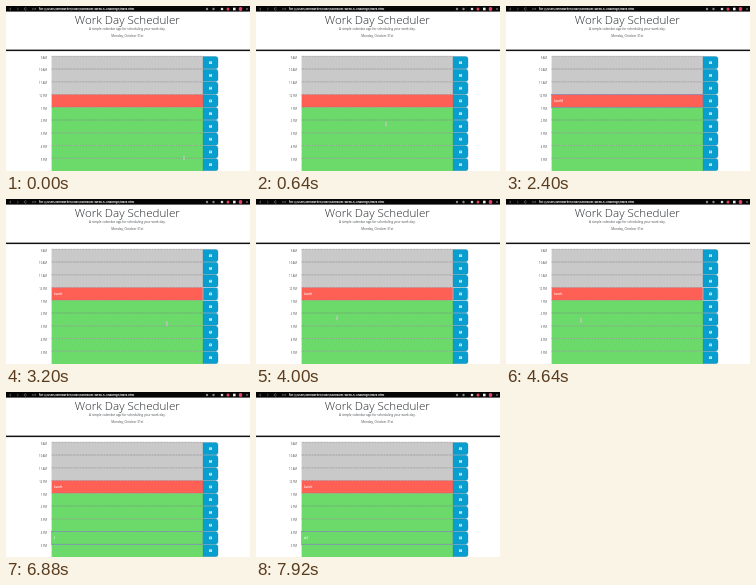
These frames come from a looping animation (244x165 px, 8 s). An HTML page with a canvas:

```html
<!DOCTYPE html>
<html lang="en">
<head>
<meta charset="utf-8">
<title>Work Day Scheduler</title>
<style>
  html, body { margin: 0; width: 100%; height: 100%; overflow: hidden; background: #fff; }
  canvas { display: block; width: 244px; height: 165px; }
</style>
</head>
<body>
<canvas id="stage"></canvas>
<script>
const W = 244, H = 165, LOOP = 8000, STEP = 80;
const LEFT = 45.6, SPLIT = 197, RIGHT = 212, TOP = 50.3, ROW = 12.75;
const HOURS = ['9 AM', '10 AM', '11 AM', '12 PM', '1 PM', '2 PM', '3 PM', '4 PM', '5 PM'];
const NOON = 3, FOUR = 7;
const PAST = '#c9c9c9', PRESENT = '#ff6056', FUTURE = '#6bda6b', BLUE = '#089fd0';
const SANS = '"Open Sans", sans-serif';

const canvas = document.getElementById('stage');
const ctx = canvas.getContext('2d');
const dpr = window.devicePixelRatio || 1;
canvas.width = W * dpr;
canvas.height = H * dpr;

// Pointer stops: time, x, y
const path = [
  [0, 178, 152], [80, 178, 152], [240, 160, 140], [400, 160, 140],
  [640, 130, 118], [800, 130, 118], [1040, 94, 96], [2480, 94, 96],
  [2800, 204, 96], [2880, 204, 96], [3280, 150, 132], [3440, 150, 132],
  [3600, 110, 128], [3840, 110, 128], [4000, 81, 119], [4640, 75, 121.5],
  [4960, 75, 121.5], [5440, 70, 137], [5600, 70, 137], [5760, 69, 140],
  [6000, 68, 146], [8000, 68, 146]
];

function pointerAt(t) {
  const i = path.findIndex((p, n) => n > 0 && t < p[0]);
  const [t0, x0, y0] = path[i - 1], [t1, x1, y1] = path[i];
  const k = (t - t0) / (t1 - t0);
  return [x0 + (x1 - x0) * k, y0 + (y1 - y0) * k];
}

function typed(word, t, start) {
  return t < start ? '' : word.slice(0, Math.floor((t - start) / STEP) + 1);
}

function rect(x, y, w, h, color) {
  ctx.fillStyle = color;
  ctx.fillRect(x, y, w, h);
}

function text(str, x, y, size, color, align = 'left', weight = 400, family = SANS) {
  ctx.font = `${weight} ${size}px ${family}`;
  ctx.textAlign = align;
  ctx.fillStyle = color;
  ctx.fillText(str, x, y);
}

function line(points, color, width, dash = []) {
  ctx.beginPath();
  points.forEach(([x, y]) => ctx.lineTo(x, y));
  ctx.strokeStyle = color;
  ctx.lineWidth = width;
  ctx.setLineDash(dash);
  ctx.stroke();
  ctx.setLineDash([]);
}

function outline(x, y, w, h, color) {
  ctx.strokeStyle = color;
  ctx.lineWidth = 0.5;
  ctx.strokeRect(x, y, w, h);
}

function dot(x, y, r, color) {
  ctx.beginPath();
  ctx.arc(x, y, r, 0, Math.PI * 2);
  ctx.fillStyle = color;
  ctx.fill();
}

function browserBar() {
  rect(0, 0, W, 5.6, '#050505');
  line([[5, 1.8], [3.6, 3], [5, 4.2]], '#aaa', 0.5);
  line([[11, 1.8], [12.4, 3], [11, 4.2]], '#777', 0.5);
  ctx.beginPath();
  ctx.arc(19.5, 3, 1.2, 0.5, 5.6);
  ctx.strokeStyle = '#aaa';
  ctx.lineWidth = 0.5;
  ctx.stroke();
  text('File', 26, 4, 2.6, '#999', 'left', 400, 'Inter, sans-serif');
  text('file:///Users/demowriter/Code/Scheduler-Week-5-Challenge/index.html',
    33, 3.9, 2.7, '#fff', 'left', 700, 'Inter, sans-serif');
  [201, 207.5].forEach(x => dot(x, 3, 1.2, '#888'));
  dot(216, 3, 1.3, '#ddd');
  dot(222, 3, 1.5, '#e0435a');
  rect(227, 1.7, 2.6, 2.6, '#eee');
  dot(234.5, 3, 1.9, '#e0436a');
  dot(241, 3, 0.8, '#aaa');
}

function header() {
  text('Work Day Scheduler', 121.3, 17.7, 11.6, '#212529', 'center', 300);
  text('A simple calendar app for scheduling your work day.', 121.3, 24.4, 3.15, '#4a4e52', 'center');
  text('Monday, October 31st', 121.3, 30.6, 3.15, '#4a4e52', 'center');
  rect(0, 43.6, W, 1.5, '#111');
}

function saveButton(y) {
  ctx.beginPath();
  ctx.roundRect(SPLIT, y + 0.2, RIGHT - SPLIT, ROW - 0.4, [0, 2.4, 2.4, 0]);
  ctx.fillStyle = BLUE;
  ctx.fill();
  ctx.strokeStyle = '#3d6f82';
  ctx.lineWidth = 0.3;
  ctx.stroke();
  const cx = 204.5, cy = y + ROW / 2;
  rect(cx - 1.3, cy - 1.3, 2.6, 2.6, '#fff');
  rect(cx - 0.8, cy - 0.9, 1.4, 0.6, BLUE);
  dot(cx, cy + 0.55, 0.4, BLUE);
}

function rows(entries) {
  HOURS.forEach((hour, i) => {
    const y = TOP + i * ROW;
    rect(LEFT, y, SPLIT - LEFT, ROW, i < NOON ? PAST : i === NOON ? PRESENT : FUTURE);
    line([[LEFT, y], [SPLIT, y]], 'rgba(110, 95, 115, 0.8)', 0.6, [1, 0.5]);
    text(hour, 41, y + 2.2, 2.7, '#4a4a4a', 'right');
    text(entries[i] || '', 48, y + 7, 2.8, '#fff', 'left', 600);
    saveButton(y);
  });
}

function fieldFocus(row, word) {
  const y = TOP + row * ROW;
  outline(LEFT, y, SPLIT - LEFT, ROW, '#7383c4');
  ctx.font = `600 2.8px ${SANS}`;
  rect(48.3 + ctx.measureText(word).width, y + 4.4, 0.35, 3.2, '#fff');
}

function buttonFocus(row) {
  outline(SPLIT, TOP + row * ROW, RIGHT - SPLIT, ROW, '#d5e6f2');
}

function pointer(x, y) {
  const beam = (color, width) => {
    line([[x, y - 1.6], [x, y + 1.6]], color, width);
    line([[x - 0.7, y - 1.7], [x + 0.7, y - 1.7]], color, width);
    line([[x - 0.7, y + 1.7], [x + 0.7, y + 1.7]], color, width);
  };
  if (x < SPLIT) {
    beam('#fff', 0.9);
    beam('#444', 0.3);
  } else {
    rect(x - 0.3, y - 1.2, 0.7, 2, '#fff');
    rect(x - 0.8, y + 0.4, 2.1, 1.6, '#fff');
  }
}

function draw(now) {
  const t = Math.floor((now % LOOP) / STEP) * STEP;
  const lunch = typed('Lunch', t, 1520);
  const later = typed('at', t, 7600);
  ctx.setTransform(dpr, 0, 0, dpr, 0, 0);
  rect(0, 0, W, H, '#fff');
  browserBar();
  header();
  rows({ [NOON]: lunch, [FOUR]: later });
  if (t >= 1200 && t < 2880) fieldFocus(NOON, lunch);
  if (t >= 2880 && t < 6160) buttonFocus(NOON);
  if (t >= 6160) fieldFocus(FOUR, later);
  const typing = (t >= 1520 && t < 2480) || t >= 6560;
  if (!typing) pointer(...pointerAt(t));
  requestAnimationFrame(draw);
}
requestAnimationFrame(draw);
</script>
</body>
</html>
```
